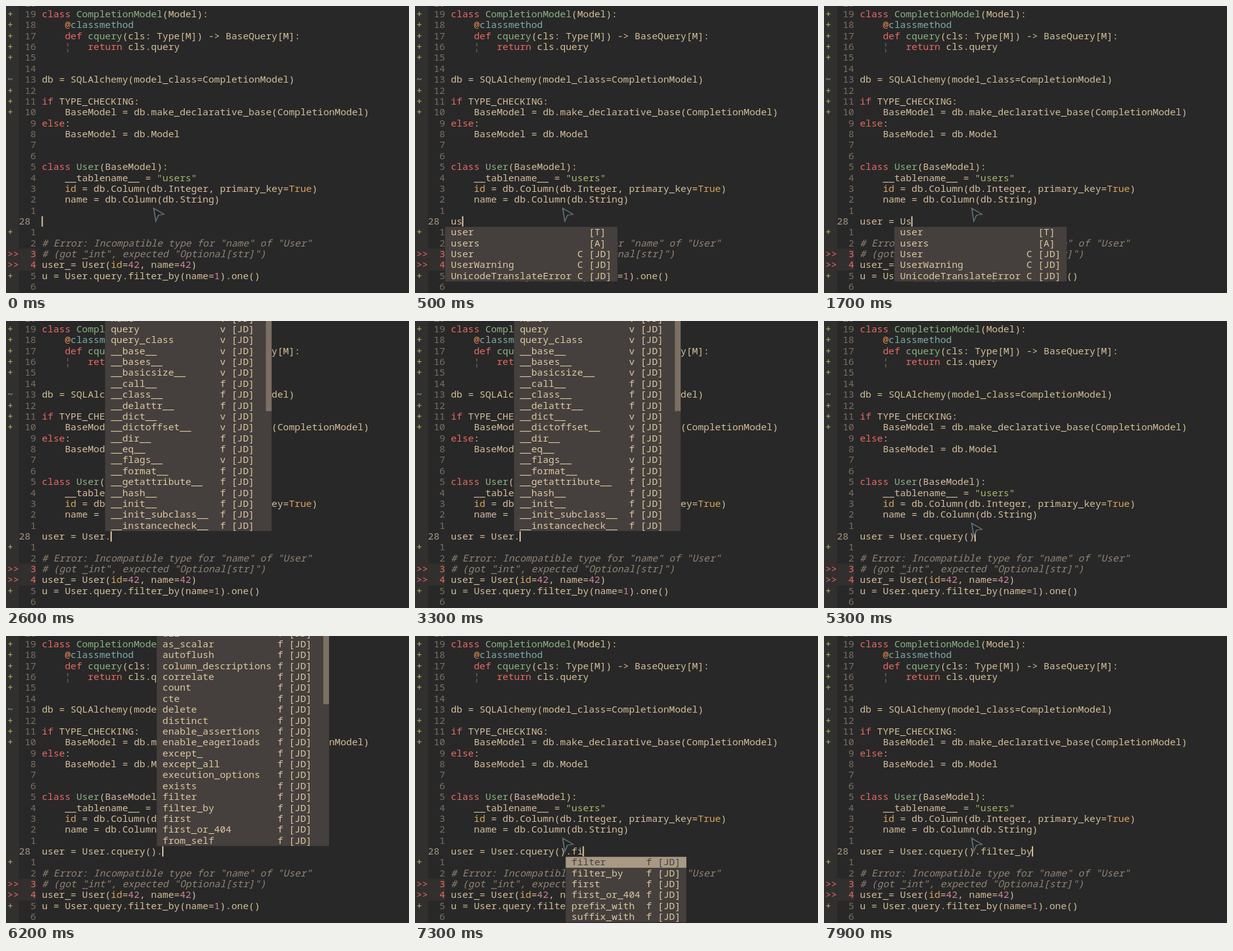
An HTML page with a canvas that plays this animation: 640 px wide and 457 px high, repeating every 8 s.

```html
<!DOCTYPE html>
<html lang="en">
<head>
<meta charset="utf-8">
<title>Editor completion</title>
<style>
html, body { margin: 0; width: 100%; height: 100%; overflow: hidden; background: #282828; }
canvas { display: block; width: 640px; height: 457px; }
</style>
</head>
<body>
<canvas id="stage"></canvas>
<script>
const W = 640, H = 457, LOOP = 8000;
const CW = 9.12, RH = 17.37, LEFT = 57, TOP = 4.3, BASE = 13.65;
const INPUT_ROW = 19;
const FONT = '15.2px "Noto Sans Mono", "DejaVu Sans Mono", monospace';
const C = {
  bg: '#282828', gutter: '#32302f', fg: '#d4be98', red: '#ea6962', orange: '#e78a4e',
  yellow: '#d8a657', green: '#a9b665', aqua: '#89b482', blue: '#7daea3', purple: '#d3869b',
  grey: '#928374', num: '#7c6f64', curNum: '#a89984', guide: '#7c6f64',
  menu: '#45403d', menuText: '#ddc7a1', pick: '#a89984', info: '#3c3836', thumb: '#7c6f64'
};

const canvas = document.getElementById('stage');
const ctx = canvas.getContext('2d');
const dpr = window.devicePixelRatio || 1;
canvas.width = W * dpr;
canvas.height = H * dpr;
ctx.scale(dpr, dpr);

const code = {
  0: 'class CompletionModel(Model):',
  1: '    @classmethod',
  2: '    def cquery(cls: Type[M]) -> BaseQuery[M]:',
  3: '    ¦   return cls.query',
  6: 'db = SQLAlchemy(model_class=CompletionModel)',
  8: 'if TYPE_CHECKING:',
  9: '    BaseModel = db.make_declarative_base(CompletionModel)',
  10: 'else:',
  11: '    BaseModel = db.Model',
  14: 'class User(BaseModel):',
  15: '    __tablename__ = "users"',
  16: '    id = db.Column(db.Integer, primary_key=True)',
  17: '    name = db.Column(db.String)',
  21: '# Error: Incompatible type for "name" of "User"',
  22: '# (got "int", expected "Optional[str]")',
  23: 'user = User(id=42, name=42)',
  24: 'u = User.query.filter_by(name=1).one()'
};
const errorRows = [22, 23];
const addedRows = [0, 1, 2, 3, 4, 7, 8, 9, 20, 24];

// Each rule: pattern, colour
const rules = [
  [/^#.*/, C.grey],
  [/"[^"]*"/, C.green],
  [/\b(class|def|return|if|else)\b/, C.red],
  [/(?<=class |def )\w+/, C.aqua],
  [/@/, C.orange],
  [/(?<=@)\w+/, C.blue],
  [/\b(True|id)\b/, C.yellow],
  [/\b\d+\b/, C.purple],
  [/¦/, C.guide]
];

function colours(line) {
  const out = Array(line.length).fill(C.fg);
  for (const [pattern, colour] of [...rules].reverse()) {
    for (const m of line.matchAll(new RegExp(pattern, 'g'))) {
      out.fill(colour, m.index, m.index + m[0].length);
    }
  }
  return out;
}

const menus = {
  names: {
    col: 0, row: 20, kind: 22, end: 29,
    items: 'user:T users:A User:C UserWarning:C UnicodeTranslateError:C'
  },
  exact: { col: 0, row: 20, kind: 22, end: 29, items: 'user:T users:A User:C UserWarning:C' },
  classes: {
    col: 7, row: 20, kind: 29, end: 36,
    items: 'user:T users:A User:C UserWarning:C UnicodeTranslateError:C'
  },
  attrs: {
    col: 12, row: -1, kind: 31, end: 40, thumb: 143.5,
    items: 'name:v query:v query_class:v __base__:v __bases__:v __basicsize__:v __call__:f ' +
      '__class__:f __delattr__:f __dict__:v __dictoffset__:v __dir__:f __eq__:f __flags__:v ' +
      '__format__:f __getattribute__:f __hash__:f __init__:f __init_subclass__:f __instancecheck__:f'
  },
  calls: {
    col: 12, row: 6, kind: 30, end: 37, info: '__get__',
    items: 'cquery:f query_class:v __call__:f __class__:f __basicsize__:v __dict__:v ' +
      '__dictoffset__:v __init_subclass__:f __instancecheck__:f __reduce__:f __reduce_ex__:f ' +
      '__subclasscheck__:f __subclasses__:f'
  },
  methods: {
    col: 21, row: -1, kind: 41, end: 50, thumb: 108.5,
    items: 'all:f as_scalar:f autoflush:f column_descriptions:f correlate:f count:f cte:f delete:f ' +
      'distinct:f enable_assertions:f enable_eagerloads:f except_:f except_all:f ' +
      'execution_options:f exists:f filter:f filter_by:f first:f first_or_404:f from_self:f'
  },
  filters: {
    col: 21, row: 20, kind: 34, end: 41,
    items: 'filter:f filter_by:f first:f first_or_404:f prefix_with:f suffix_with:f'
  }
};
for (const m of Object.values(menus)) m.items = m.items.split(' ').map(s => s.split(':'));

// Start time, typed text, open menu, selected item
const steps = [
  [0, ''],
  [300, 'u'],
  [400, 'us'],
  [500, 'us', 'names'],
  [1000, 'use', 'exact'],
  [1100, 'user', 'exact'],
  [1200, 'user '],
  [1300, 'user ='],
  [1400, 'user = '],
  [1600, 'user = U'],
  [1700, 'user = Us', 'classes'],
  [1900, 'user = Use', 'classes'],
  [2000, 'user = User', 'classes'],
  [2200, 'user = User.'],
  [2400, 'user = User.', 'attrs'],
  [3500, 'user = User.c', 'calls'],
  [3900, 'user = User.c', 'calls', 0],
  [4500, 'user = User.cquery'],
  [4900, 'user = User.cquery('],
  [5100, 'user = User.cquery()'],
  [5600, 'user = User.cquery().'],
  [5800, 'user = User.cquery().', 'methods'],
  [6500, 'user = User.cquery().f', 'methods'],
  [6700, 'user = User.cquery().fi', 'filters'],
  [7100, 'user = User.cquery().fi', 'filters', 0],
  [7500, 'user = User.cquery().fi', 'filters', 1],
  [7700, 'user = User.cquery().filter_by']
];

const x = col => LEFT + col * CW;
const y = row => TOP + row * RH;

function text(str, col, row, colour) {
  for (let i = 0; i < str.length; i++) {
    ctx.fillStyle = Array.isArray(colour) ? colour[i] : colour;
    ctx.fillText(str[i], x(col + i), y(row) + BASE);
  }
}

function box(col, row, endCol, rows, colour) {
  ctx.fillStyle = colour;
  ctx.fillRect(x(col), y(row), (endCol - col) * CW, rows * RH);
}

function underline(col, row, colour) {
  ctx.fillStyle = colour;
  ctx.fillRect(x(col), y(row) + BASE + 1.5, CW, 1.2);
}

function drawGutter() {
  ctx.fillStyle = C.gutter;
  ctx.fillRect(0, 0, x(-4), H);
  for (let row = -1; row <= 25; row++) {
    const n = String(Math.abs(INPUT_ROW - row) || 28);
    const bad = errorRows.includes(row);
    if (bad) {
      box(-4, row, -1, 1, C.gutter);
      text('>>', -6, row, C.red);
    }
    if (row === INPUT_ROW) text(n, -4, row, C.curNum);
    else text(n, -1 - n.length, row, bad ? C.red : C.num);
  }
  for (const row of addedRows) text('+', -6, row, C.green);
  text('~', -6, 6, C.blue);
}

function drawCode() {
  for (const row in code) {
    ctx.font = (code[row][0] === '#' ? 'italic ' : '') + FONT;
    text(code[row], 0, +row, colours(code[row]));
  }
  ctx.font = FONT;
  underline(7, 22, C.grey);
  underline(4, 23, C.fg);
}

function drawMenu(m, pick) {
  box(m.col - 1, m.row, m.end, m.items.length, C.menu);
  m.items.forEach(([word, kind], i) => {
    const row = m.row + i, on = i === pick;
    if (on) box(m.col - 1, row, m.end, 1, C.pick);
    const colour = on ? C.menu : C.menuText;
    const plain = 'TA'.includes(kind);
    text(word, m.col, row, colour);
    if (!plain) text(kind, m.kind, row, colour);
    text(plain ? `[${kind}]` : '[JD]', m.kind + 2, row, colour);
  });
  if (m.thumb) {
    ctx.fillStyle = C.thumb;
    ctx.fillRect(x(m.end - 1), 0, CW, m.thumb);
  }
  if (m.info && pick === 0) {
    box(m.end, m.row, m.end + m.info.length + 2, 1, C.info);
    text(m.info, m.end + 1, m.row, C.menuText);
  }
}

function facet(colour, ...points) {
  ctx.beginPath();
  for (const [px, py] of points) ctx.lineTo(px, py);
  ctx.closePath();
  ctx.fillStyle = colour;
  ctx.fill();
}

function drawPointer() {
  const tip = [233.5, 320.5], right = [253, 332], notch = [243, 333.5], foot = [237.5, 345.5];
  facet('#657071', tip, right, notch, foot);
  facet('#1b2427', [236, 324], [249, 331.3], [241.5, 332.5], [238.3, 340]);
}

function draw(t) {
  const [, typed, name, pick] = steps.findLast(s => s[0] <= t);
  const menu = menus[name];
  ctx.fillStyle = C.bg;
  ctx.fillRect(0, 0, W, H);
  ctx.font = FONT;
  drawGutter();
  drawCode();
  text(typed, 0, INPUT_ROW, C.fg);
  ctx.fillStyle = C.menuText;
  ctx.fillRect(x(typed.length) - 0.5, y(INPUT_ROW) + 0.5, 2, RH - 1);
  if (menu) drawMenu(menu, pick);
  if (!menu || !menu.thumb) drawPointer();
}

const start = performance.now();
function tick() {
  draw((performance.now() - start) % LOOP);
  requestAnimationFrame(tick);
}
tick();
</script>
</body>
</html>
```
